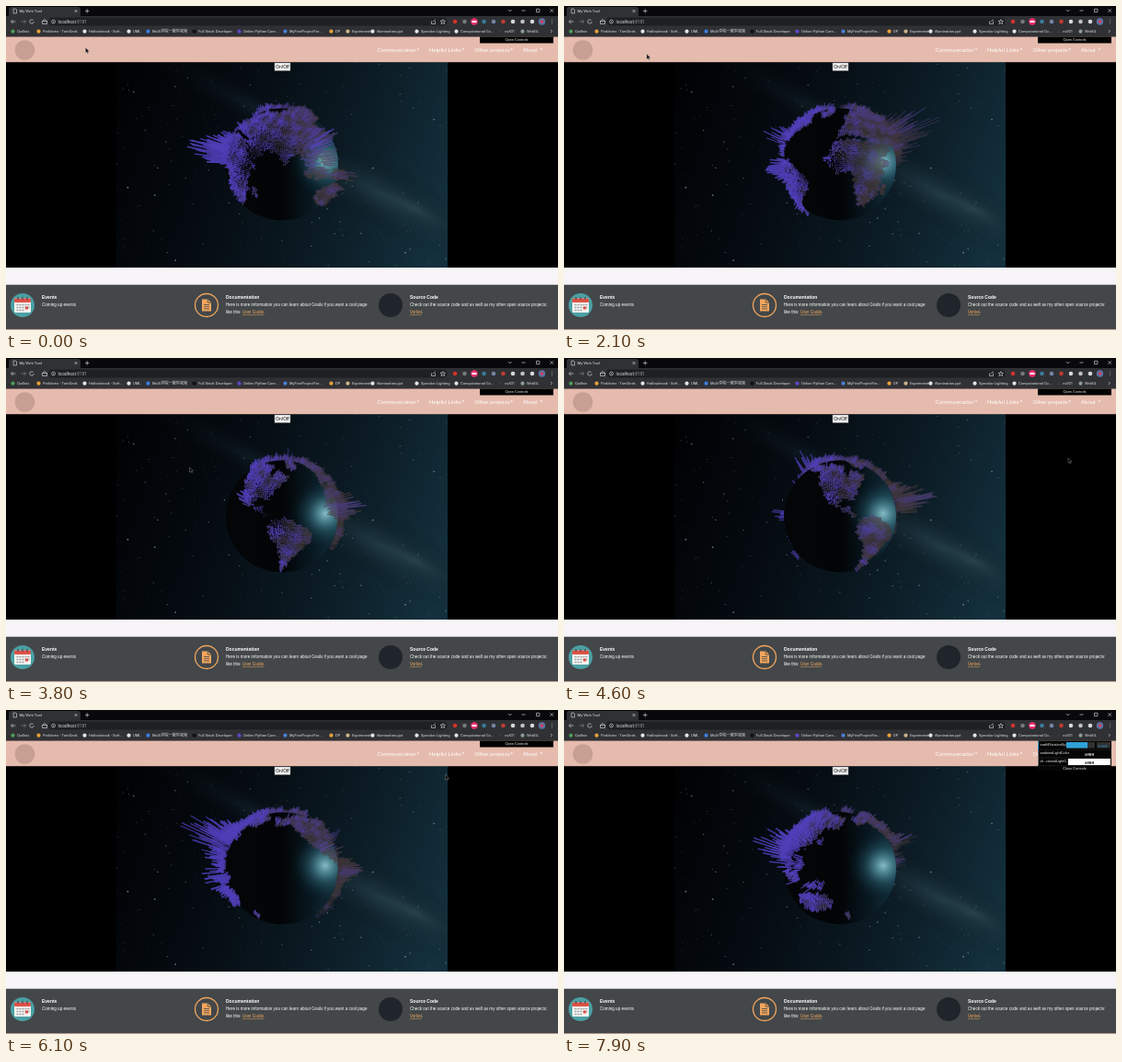
These frames come from a looping animation (600x353 px, 8000 ms). An HTML page with a canvas:

```html
<!DOCTYPE html>
<html lang="en">
<head>
<meta charset="utf-8">
<title>My Web Tool</title>
<style>
html, body { margin: 0; width: 100%; height: 100%; overflow: hidden; background: #000; }
canvas, svg { position: absolute; left: 0; top: 0; }
canvas { left: 120px; top: 61px; }
text { font-family: "Liberation Sans", Arial, sans-serif; white-space: pre; }
.tab { font: 4.3px Roboto, "Noto Sans CJK SC", sans-serif; fill: #dcdee2; }
.nav { font-size: 6.05px; fill: #fff; }
.body { font-size: 4.6px; fill: #fff; }
.head { font-size: 5px; font-weight: bold; fill: #fff; }
.link { fill: #f2a65e; text-decoration: underline; }
.tiny { font-size: 3.9px; fill: #eee; }
.icon { fill: none; stroke: #c8cace; stroke-width: .7; }
</style>
</head>
<body>
<canvas id="sky" width="360" height="224"></canvas>
<canvas id="globe" width="360" height="224"></canvas>
<svg width="600" height="353" viewBox="0 0 600 353">
  <!-- browser -->
  <rect width="600" height="11" fill="#09090b"/>
  <path d="M3 11V4q0-3 3-3H78q3 0 3 3v7z" fill="#303134"/>
  <rect y="11" width="600" height="22.5" fill="#303134"/>
  <rect x="46" y="12.5" width="434" height="9" rx="4.5" fill="#1f2023"/>
  <path class="icon" d="M8 3h2.5l1 1v4H8z"/>
  <path class="icon" d="M74.5 4l3 3m0-3l-3 3M86 5.5h4.4M88.2 3.3v4.4"/>
  <text class="tab" x="14.5" y="7.2">My Web Tool</text>
  <path class="icon" d="M546 4l1.8 1.8L549.6 4M560.5 5h4M576.5 3.3h3.4v3.4h-3.4z"/>
  <path class="icon" d="M591.5 3.3l3.5 3.5m0-3.5l-3.5 3.5"/>
  <path class="icon" d="M10.5 17h-5m2.2-2.2L5.5 17l2.2 2.2"/>
  <path class="icon" d="M16.5 17h5m-2.2-2.2l2.2 2.2-2.2 2.2" opacity=".5"/>
  <circle class="icon" cx="28" cy="17" r="2.2" stroke-dasharray="11 3"/>
  <path class="icon" d="M39.5 19.5v-3h5v3zM39 17l3-2.5 3 2.5"/>
  <circle class="icon" cx="51.5" cy="17" r="2"/>
  <path class="icon" d="M51.5 16.5v1.7"/>
  <text class="tab" x="56.5" y="18.7" style="font-size:4.8px">localhost<tspan fill="#96999e">:8181</tspan></text>
  <path class="icon" d="M462.5 16.5v3h4v-3M464 17.5l2.500-3"/>
  <path class="icon" d="M474.800 14.600l.7 1.700h2l-1.500 1.300.6 2-1.800-1-1.800 1 .6-2-1.500-1.300h2z"/>
  <g id="chips"></g>
  <g id="marks"></g>
  <path class="icon" d="M593.500 14.500v5" stroke-dasharray=".8 1.200"/>
  <path class="icon" d="M592 26l1.500 1.500L592 29"/>

  <!-- site header -->
  <rect y="33.5" width="600" height="27.7" fill="#e5bbad"/>
  <circle cx="20.5" cy="48" r="10.8" fill="#c79f93"/>
  <rect id="hover" x="456" y="34.5" width="48" height="25.5" fill="#f8bd72"/>
  <g id="nav"></g>
  <rect x="292" y="62" width="17" height="8.5" fill="#f4f4f4" stroke="#888" stroke-width=".5"/>
  <text x="293.3" y="68" font-size="4.9">On/Off</text>

  <!-- control panel -->
  <g id="closed">
    <rect x="515" y="33.5" width="80" height="7" fill="#000"/>
    <text class="tiny" x="555" y="38.3" text-anchor="middle">Open Controls</text>
  </g>
  <g id="open">
    <rect x="515" y="33.5" width="80" height="33" fill="#050505"/>
    <path d="M515 43.2h80M515 52h80M515 60.6h80" stroke="#2c2c2c" stroke-width=".5"/>
    <path d="M515.5 34v9" stroke="#2fa1d6"/>
    <path d="M515.5 43.5v17" stroke="#777"/>
    <text class="tiny" x="517.5" y="39.3">earthRotationSp...</text>
    <rect x="546" y="35" width="31" height="6.5" fill="#303030"/>
    <rect x="546" y="35" width="23" height="6.5" fill="#2fa1d6"/>
    <rect x="579" y="35" width="15" height="6.5" fill="#303030"/>
    <text class="tiny" x="581" y="41" style="fill:#2fa1d6">0.005</text>
    <text class="tiny" x="517.5" y="48.2">ambientLightColor</text>
    <text class="tiny" x="571" y="49.6" text-anchor="middle" font-weight="bold">#ffffff</text>
    <text class="tiny" x="517.5" y="57.2">di...ctionalLightC...</text>
    <rect x="548" y="53" width="46" height="7" fill="#fff"/>
    <text x="571" y="58.5" font-size="3.9" text-anchor="middle" font-weight="bold">#ffffff</text>
    <text class="tiny" x="555" y="64.8" text-anchor="middle">Close Controls</text>
  </g>

  <!-- footer -->
  <rect y="285" width="600" height="19" fill="#f8f5f8"/>
  <rect y="303.7" width="600" height="49.3" fill="#434749"/>
  <rect y="352.2" width="600" height=".8" fill="#d9b1a5"/>
  <circle cx="18" cy="326" r="13" fill="#4aa0a3"/>
  <rect x="9" y="318.5" width="18" height="15.5" rx="1.5" fill="#f5f2ee"/>
  <rect x="9" y="318.5" width="18" height="4.5" rx="1" fill="#df5148"/>
  <path d="M13 317v3M18 317v3M23 317v3" stroke="#394a52" stroke-width="1.2"/>
  <path d="M11.5 325.5h14M11.5 328.5h14M11.5 331.5h9" stroke="#9aa4aa" stroke-width="1.7" stroke-dasharray="2 1"/>
  <rect x="21" y="327.5" width="3" height="3" fill="#df5148"/>
  <circle cx="218" cy="326" r="12.5" fill="none" stroke="#f2a65e" stroke-width="1.3"/>
  <path d="M213 319.5h6.5l3.5 3.5v9.5h-10z" fill="#f2a65e"/>
  <path d="M219.3 319.5v3.7h3.7M215 325.5h6m-6 2.2h6m-6 2.2h6" stroke="#434749" stroke-width=".8" fill="none"/>
  <circle cx="418" cy="326" r="13" fill="#20242b"/>
  <text class="head" x="39" y="319">Events</text>
  <text class="body" x="39" y="327">Coming up events</text>
  <text class="head" x="239" y="319">Documentation</text>
  <text class="body" x="239" y="327">Here is more information you can learn about Grails if you want a cool page</text>
  <text class="body" x="239" y="335">like this: <tspan class="link">User Guide</tspan>.</text>
  <text class="head" x="439" y="319">Source Code</text>
  <text class="body" x="439" y="327">Check out the source code and as well as my other open source projects:</text>
  <text class="body" x="439" y="335"><tspan class="link">Vorkel</tspan>.</text>
  <path id="cursor" d="M0 0V5.4L1.3 4.3 2.2 6.2 3 5.8 2.2 4H4z" fill="#080808" stroke="#aaa" stroke-width=".35"/>
</svg>
<script>
const $ = id => document.getElementById(id);
const RAD = Math.PI / 180, LOOP = 8000, R = 61, CX = 180, CY = 111.5, TILT = 11 * RAD;
let seed = 7;
const rnd = () => (seed = (seed * 16807) % 2147483647) / 2147483647;
const clamp = (v, a, b) => Math.min(b, Math.max(a, v));

// Toolbar chips, bookmarks and menu
const chip = (x, y, r, color) => `<circle cx="${x}" cy="${y}" r="${r}" fill="${color}"/>`;
const chipColors = ['#d0342c', '#75797d', '#ec2f6d', '#397d9b', '#7586a5', '#c13b30', '#d5d7da', '#bfc2c5', '#d5d7da', '#5874a4'];
$('chips').innerHTML = chipColors.map((c, i) => chip(488 + i * 10.5, 17, i === 2 || i === 9 ? 3.7 : 2.3, c)).join('') +
  '<rect x="506.5" y="16" width="5" height="2" fill="#fff"/>' + chip(582.5, 17, 1.8, '#d63c62');

$('marks').innerHTML = [
  [12, 'Quillnix', '#4c9d57'], [40, 'Problems - TarnDesk', '#e6a13b'], [90, 'Hallowbrook - Soft...', '#e3e4e6'],
  [138, 'UML', '#e3e4e6'], [159, 'MoXi学院一教学视频', '#3d7ce0'], [209, 'Full Stack Developer', '#101012'],
  [258, 'Online Python Com...', '#6045c8'], [308, 'MyFirstProjectFor...', '#4a80d6'], [358, 'DP', '#e6a13b'],
  [376, 'Experiments', '#c9b48a'], [403, 'illumination.ppt', '#e3e4e6'], [451, 'Specular Lighting', '#e3e4e6'],
  [494, 'Computational Co...', '#e3e4e6'], [542, 'cs301', '#35373a'], [566, 'WebGL', '#8a9b93']
].map(([x, s, c]) => chip(x - 4.5, 27.7, 2.1, c) + `<text class="tab" style="font-size:4.1px" x="${x}" y="29.2">${s}</text>`).join('');

$('nav').innerHTML = [[403.5, 'Communication', 446.5], [460, 'Helpful Links', 495.5], [509.5, 'Other projects', 548], [562, 'About', 580.5]]
  .map(([x, s, a]) => `<g class="nav"><text x="${x}" y="49.5">${s}</text><path d="M${a} 46.4h3l-1.5 1.6z"/></g>`).join('');
const helpful = $('nav').children[1];

// Night sky
function paintSky() {
  const g = $('sky').getContext('2d');
  const base = g.createLinearGradient(0, 30, 360, 150);
  ['#010204', '#050b11', '#0b1a23', '#13303c'].forEach((c, i) => base.addColorStop(i / 3, c));
  g.fillStyle = base;
  g.fillRect(0, 0, 360, 224);
  const cloud = (x, y, rx, ry, color) => {
    g.save();
    g.translate(x, y); g.rotate(.5); g.scale(rx, ry);
    const c = g.createRadialGradient(0, 0, 0, 0, 0, 1);
    c.addColorStop(0, color); c.addColorStop(1, 'rgba(0,0,0,0)');
    g.fillStyle = c;
    g.fillRect(-1, -1, 2, 2);
    g.restore();
  };
  cloud(290, 145, 150, 36, '#486c7a55');
  cloud(325, 160, 60, 14, '#5f7d8733');
  cloud(150, 50, 150, 24, '#26415040');
  for (let i = 0; i < 520; i++) {
    const size = .4 + rnd() ** 5 * 1.2;
    g.fillStyle = `rgba(165,200,215,${.12 + rnd() ** 2 * .7})`;
    g.fillRect(rnd() * 360, rnd() * 224, size, size);
  }
}

// Rough coastlines as longitude, latitude pairs
const africa = [-17,15,-8,34,10,37,32,31,43,12,51,11,40,-4,40,-16,28,-33,19,-35,12,-17,9,4,-7,4];
const eurasia = [-9,37,-1,48,8,57,6,62,26,71,75,73,105,78,178,69,160,53,137,54,128,36,122,30,108,20,
  109,12,104,1,95,17,88,21,78,8,72,21,57,25,54,17,44,13,35,31,27,38,16,39,3,42];
const north = [-168,66,-125,70,-82,68,-94,59,-80,53,-77,62,-56,52,-75,38,-81,26,-95,29,-97,20,-88,20,
  -79,8,-106,22,-124,42,-135,59,-162,57];
const south = [-78,8,-62,10,-35,-7,-39,-18,-58,-38,-68,-55,-71,-20,-81,-5];

function inside(p, x, y) {
  let hit = false;
  for (let i = 0, j = p.length - 2; i < p.length; j = i, i += 2)
    if ((p[i + 1] > y) !== (p[j + 1] > y) && x < (p[j] - p[i]) * (y - p[i + 1]) / (p[j + 1] - p[i + 1]) + p[i]) hit = !hit;
  return hit;
}

// Islands: longitude, latitude, half width, half height
const islands = [[134,-25,20,11], [-40,73,16,10], [102,0,4,4], [114,0,6,6], [140,-5,8,4], [122,12,3,6],
  [138,37,3,5], [47,-19,3,6], [172,-42,3,5]];

function isLand(lon, lat) {
  const x = lon + Math.sin(lat * .9) * 1.3, y = lat + Math.sin(lon * .8) * 1.2;
  return [africa, eurasia, north, south].some(c => inside(c, x, y)) ||
    islands.some(([a, b, w, h]) => ((x - a) / w) ** 2 + ((y - b) / h) ** 2 < 1);
}

// Peaks: longitude, latitude, spread, height
const peaks = [[-8,14,12,.75], [108,23,15,.95], [130,-2,14,.65], [-70,3,13,.35], [-105,20,10,.5]];

const land = [];
function growLand() {
  for (let lat = -56; lat < 82; lat += 1.7)
    for (let lon = -180; lon < 180; lon += 1.7 / Math.cos(lat * RAD)) {
      if (!isLand(lon, lat)) continue;
      const wave = Math.sin(lon * .19 + lat * .11) * Math.sin(lat * .23 - lon * .07);
      let h = .04 + .05 * (wave + 1) * rnd() + .04 * rnd();
      for (const [a, b, s, top] of peaks)
        h += top * Math.exp(-((lon - a) ** 2 + (lat - b) ** 2) / (s * s)) * rnd() ** 1.6;
      land.push({ lon: lon * RAD, s: Math.sin(lat * RAD), c: Math.cos(lat * RAD), h, tint: wave * .3 + (rnd() - .5) * .5 });
    }
}

const g = $('globe').getContext('2d');
const SHADES = 8;
const shades = Array.from({ length: SHADES }, (_, i) => {
  const k = i / (SHADES - 1), mix = (a, b) => Math.round(a + (b - a) * k);
  return `rgb(${mix(61, 80)},${mix(53, 63)},${mix(55, 188)})`;
});

function strokeLand(lines, alpha) {
  g.globalAlpha = alpha;
  lines.forEach((path, i) => { g.strokeStyle = shades[i]; g.stroke(path); });
  g.globalAlpha = 1;
}

function fillDisc(gradient, colors) {
  colors.forEach((c, i) => gradient.addColorStop(i / (colors.length - 1), c));
  g.fillStyle = gradient;
  g.beginPath();
  g.arc(CX, CY, R, 0, 7);
  g.fill();
}
const spot = r => g.createRadialGradient(CX + 47, CY - 3, 0, CX + 47, CY - 3, r);

function paintGlobe(center) {
  g.clearRect(0, 0, 360, 224);
  const layer = () => Array.from({ length: SHADES }, () => new Path2D());
  const backLeft = layer(), backRight = layer(), front = layer();
  const st = Math.sin(TILT), ct = Math.cos(TILT);
  for (const p of land) {
    const a = p.lon - center * RAD, z0 = p.c * Math.cos(a);
    const x = p.c * Math.sin(a), y = p.s * ct - z0 * st, z = p.s * st + z0 * ct;
    const out = R * (1 + p.h);
    if (z < 0 && Math.hypot(x, y) * out < R) continue;
    const purple = clamp(.38 - .6 * x + p.tint + .55 * p.h, 0, 1);
    const set = z >= 0 ? front : x < 0 ? backLeft : backRight;
    const path = set[Math.round(purple * (SHADES - 1))];
    const inner = R * (1 + p.h * .25);
    path.moveTo(CX + x * inner - .6, CY - y * inner);
    path.lineTo(CX + x * out + .6, CY - y * out);
  }
  g.lineWidth = 1.2;
  strokeLand(backLeft, .75);
  strokeLand(backRight, .5);

  fillDisc(g.createLinearGradient(CX - R, 0, CX + R, 0), ['#030507', '#030507', '#020406', '#08171f', '#12303c']);
  fillDisc(spot(39), ['#84bec9d9', '#5292a199', '#285b6c66', '#19404f38', '#0a1e2800']);

  g.lineWidth = 1.45;
  strokeLand(front, .88);
  g.globalCompositeOperation = 'screen';
  fillDisc(spot(30), ['#5a96a060', '#14323c00']);
  g.globalCompositeOperation = 'source-over';
}

// Linear track of [time, ...values]
function track(keys, t) {
  const i = keys.findIndex(k => k[0] > t);
  if (i < 0) return keys[keys.length - 1].slice(1);
  const a = keys[i - 1], b = keys[i], k = (t - a[0]) / (b[0] - a[0]);
  return a.slice(1).map((v, n) => v + (b[n + 1] - v) * k);
}
const spin = [[0, 76], [900, 42], [7200, -194], [7900, -198]];
const pointer = [[0, 86.5, 45.5], [900, 92, 52.5], [2100, 90, 52.5], [3400, 91, 53], [3600, 114, 62], [3800, 199.5, 119],
  [4200, 400, 125], [4700, 585, 105], [5400, 476.5, 76], [6400, 478, 68], [6800, 502.5, 35.5], [7100, 550, 37], [7500, 578, 42]];

function draw(t) {
  const [x, y] = track(pointer, t), hovered = t >= 6500 && t < 6900, opened = t >= 7200;
  const show = (id, on) => { $(id).style.display = on ? '' : 'none'; };
  paintGlobe(track(spin, t)[0]);
  $('cursor').setAttribute('transform', `translate(${x} ${y})`);
  show('cursor', t < 7600);
  show('hover', hovered);
  show('open', opened);
  show('closed', !opened);
  helpful.style.fill = hovered ? '#111' : '#fff';
}

paintSky();
growLand();
const start = performance.now();
let last = -1;
function tick() {
  const t = Math.floor((performance.now() - start) % LOOP / 100) * 100;
  if (t !== last) draw(last = t);
  requestAnimationFrame(tick);
}
tick();
</script>
</body>
</html>
```
